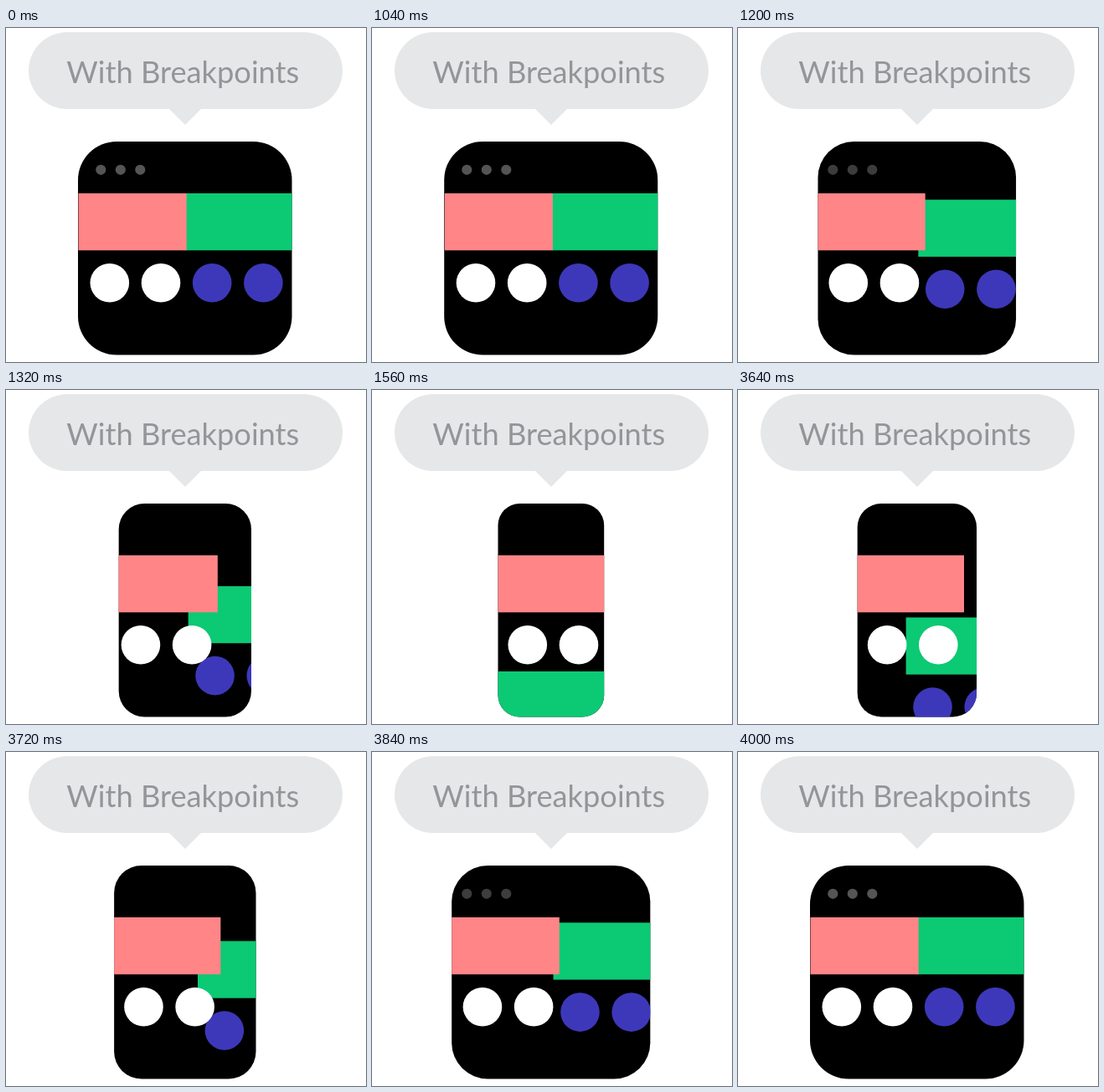
An HTML page with a canvas that plays this animation: 430 by 400 pixels, repeating every 5.04 s.

```html
<!DOCTYPE html>
<html lang="en">
<head>
<meta charset="utf-8">
<title>With Breakpoints</title>
<style>
  html, body { margin: 0; width: 100%; height: 100%; overflow: hidden; background: #fff; }
  canvas { display: block; }
</style>
</head>
<body>
<canvas id="stage" width="430" height="400"></canvas>
<script>
const ctx = document.getElementById('stage').getContext('2d');
const LOOP = 5040, STEP = 40;
const SHRINK_AT = 1000, SHRUNK_AT = 1560, GROW_AT = 3440, GROWN_AT = 4000;

const lerp = (a, b, p) => a + (b - a) * p;
const clamp = v => Math.max(0, Math.min(1, v));

// Cubic bezier easing with control points (a, 0) and (b, 1)
function ease(u, a, b) {
  if (u <= 0 || u >= 1) return clamp(u);
  let lo = 0, hi = 1, s;
  for (let i = 0; i < 30; i++) {
    s = (lo + hi) / 2;
    const x = 3 * s * (1 - s) ** 2 * a + 3 * s * s * (1 - s) * b + s ** 3;
    if (x < u) lo = s; else hi = s;
  }
  return s * s * (3 - 2 * s);
}

// 0 = wide layout, 1 = narrow layout; each part has its own curve per direction
function narrowness(time, shrinkCurve, growCurve, delay = 0) {
  const start = SHRINK_AT + delay;
  return time < GROW_AT
    ? ease((time - start) / (SHRUNK_AT - start), ...shrinkCurve)
    : 1 - ease((time - GROW_AT) / (GROWN_AT - GROW_AT), ...growCurve);
}

function circle(x, y, r, color) {
  ctx.fillStyle = color;
  ctx.beginPath();
  ctx.arc(x, y, r, 0, Math.PI * 2);
  ctx.fill();
}

function rect(x, y, w, h, color) {
  ctx.fillStyle = color;
  ctx.fillRect(x, y, w, h);
}

function drawBubble() {
  ctx.fillStyle = '#e6e7e8';
  ctx.beginPath();
  ctx.roundRect(27, 5, 375, 92, 46);
  ctx.fill();
  ctx.beginPath();
  ctx.moveTo(194, 96);
  ctx.lineTo(234, 96);
  ctx.lineTo(214, 116);
  ctx.fill();
  ctx.fillStyle = '#939598';
  ctx.font = '36.25px Lato, sans-serif';
  ctx.textAlign = 'center';
  ctx.fillText('With Breakpoints', 211.3, 65.5);
}

function drawWindow(time) {
  const frame = narrowness(time, [.75, .23], [.75, .42]);
  const slide = 62 * narrowness(time, [.75, .36], [.75, .4]);
  const wrap = narrowness(time, [.9, .44], [.54, .105], STEP);
  const left = lerp(86, 150.5, frame), right = lerp(341.5, 277.2, frame);

  ctx.save();
  ctx.beginPath();
  ctx.roundRect(left, 136, right - left, 255.5, lerp(46, 26, frame));
  ctx.fillStyle = '#000';
  ctx.fill();
  ctx.clip();

  ctx.globalAlpha = clamp(1 - 2 * frame);
  for (let i = 0; i < 3; i++) circle(113.3 + 23.5 * i, 169.8, 6.1, '#555');
  ctx.globalAlpha = 1;

  const dx = slide - 127 * wrap, dy = 139 * wrap;
  rect(214.3 + dx, 198 + dy, 130, 68.3, '#0cc974');
  for (const x of [246.2, 307.4]) circle(x + dx, 305.2 + dy, 23.3, '#3d38b9');

  rect(86.5 + slide, 198, 129.2, 68.3, '#ff8587');
  for (const x of [123.8, 185]) circle(x + slide, 305.2, 23.3, '#fff');
  ctx.restore();
}

function draw() {
  const time = Math.floor(performance.now() % LOOP / STEP) * STEP;
  rect(0, 0, 430, 400, '#fff');
  drawBubble();
  drawWindow(time);
  requestAnimationFrame(draw);
}
draw();
</script>
</body>
</html>
```
